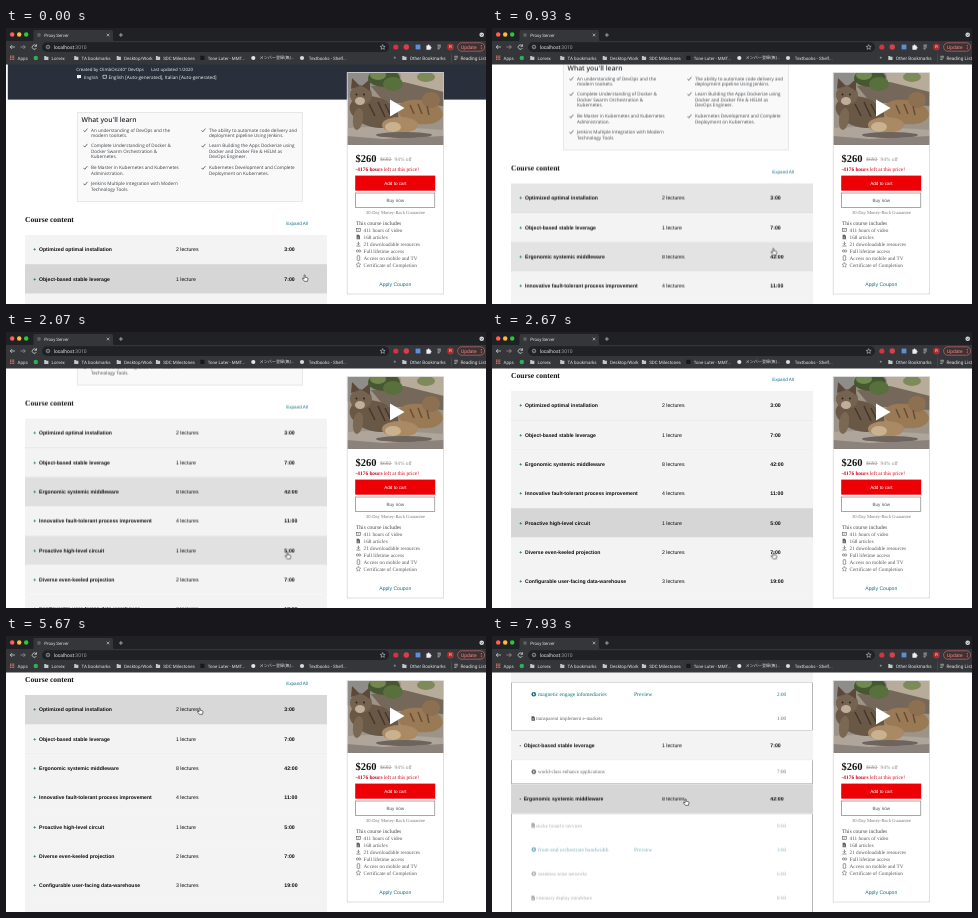
Recreate the animation shown at these times as an HTML page. Size 480 px wide and 276 px high, loop 8000 ms.

```html
<!DOCTYPE html>
<html lang="en">
<head>
<meta charset="utf-8">
<title>Course page</title>
<style>
html, body { margin: 0; width: 100%; height: 100%; overflow: hidden; background: #fff; }
svg { display: block; width: 100vw; height: 100vh; }
text { white-space: pre; text-rendering: geometricPrecision; }
.ui { font-family: Roboto, "Noto Sans CJK JP", "Noto Sans CJK", sans-serif; }
.open { font-family: "Open Sans", sans-serif; }
.sans { font-family: "Liberation Sans", Arial, sans-serif; }
.serif { font-family: "Liberation Serif", Times, serif; }
.b { font-weight: 700; }
.semi { font-weight: 600; }
.end { text-anchor: end; }
.mid { text-anchor: middle; }

.anim { animation-duration: 8s; animation-iteration-count: infinite; animation-timing-function: ease-in-out; }
.hover { opacity: 0; animation-timing-function: linear; }
.toggle { animation-timing-function: step-end; }

#page { animation-name: scroll; }
@keyframes scroll {
  0%, .9% { transform: translateY(0); }
  8.1%, 20.9% { transform: translateY(-51.5px); }
  25.6%, 31.6% { transform: translateY(-120.5px); }
  33.2%, 87.8% { transform: translateY(-148px); }
  90.9%, 100% { transform: translateY(-190px); }
}
#cursor { animation-name: point; }
@keyframes point {
  0%, .9% { transform: translate(299px, 250px); }
  5%, 35.9% { transform: translate(281.7px, 223.5px); }
  45.9%, 46.6% { transform: translate(225px, 190px); }
  52.5%, 57.5% { transform: translate(225px, 259px); }
  67.5%, 68.4% { transform: translate(200px, 118px); }
  70.9%, 78.8% { transform: translate(194px, 75px); }
  81%, 83.5% { transform: translate(194px, 152px); }
  86%, 88.5% { transform: translate(194px, 181px); }
  90.9%, 100% { transform: translate(194px, 166px); }
}
#push1 { animation-name: push1; }
#push2 { animation-name: push2; }
#push3 { animation-name: push3; }
@keyframes push1 { 0%, 75% { transform: translateY(0); } 78.5%, 100% { transform: translateY(48.2px); } }
@keyframes push2 { 0%, 82.5% { transform: translateY(0); } 85%, 100% { transform: translateY(24.3px); } }
@keyframes push3 { 0%, 93.4% { transform: translateY(0); } 98.8%, 100% { transform: translateY(195px); } }

#items3 { animation-name: appear; animation-timing-function: linear; }
@keyframes appear { 0%, 93.4% { opacity: 0; } 99.1% { opacity: .55; } 100% { opacity: .6; } }

.plus1 { animation-name: off1; } .minus1 { animation-name: on1; }
.plus2 { animation-name: off2; } .minus2 { animation-name: on2; }
.plus3 { animation-name: off3; } .minus3 { animation-name: on3; }
@keyframes on1 { 0% { opacity: 0; } 75%, 100% { opacity: 1; } }
@keyframes off1 { 0% { opacity: 1; } 75%, 100% { opacity: 0; } }
@keyframes on2 { 0% { opacity: 0; } 82.5%, 100% { opacity: 1; } }
@keyframes off2 { 0% { opacity: 1; } 82.5%, 100% { opacity: 0; } }
@keyframes on3 { 0% { opacity: 0; } 93.4%, 100% { opacity: 1; } }
@keyframes off3 { 0% { opacity: 1; } 93.4%, 100% { opacity: 0; } }

#hover1 { animation-name: hover1; }
#hover2 { animation-name: hover2; }
#hover3 { animation-name: hover3; }
#hover5 { animation-name: hover5; }
#hover6 { animation-name: hover6; }
#hover7 { animation-name: hover7; }
@keyframes hover1 {
  0%, 1.2%, 15%, 69.5%, 82%, 100% { opacity: 0; }
  4%, 9%, 71%, 79% { opacity: 1; }
  11.6% { opacity: .5; }
}
@keyframes hover2 { 0%, 1.2%, 81.5%, 88% { opacity: 1; } 4%, 80%, 91%, 100% { opacity: 0; } }
@keyframes hover3 {
  0%, 9%, 30%, 89.5% { opacity: 0; }
  11.6% { opacity: .55; }
  15%, 21%, 91.5%, 100% { opacity: 1; }
  25.9% { opacity: .7; }
}
@keyframes hover5 { 0%, 23%, 56%, 100% { opacity: 0; } 25.9% { opacity: .6; } 30%, 53.5% { opacity: 1; } }
@keyframes hover6 { 0%, 34%, 43%, 100% { opacity: 0; } 36%, 40% { opacity: .8; } }
@keyframes hover7 { 0%, 53.5%, 61%, 100% { opacity: 0; } 56%, 58% { opacity: 1; } }
</style>
</head>
<body>
<svg id="stage" viewBox="0 0 480 276" preserveAspectRatio="none"></svg>
<script>
const PITCH = 29.3, ITEM = 24.2, TOP = 207;
const TEAL = '#126f84';

// y is the vertical middle of the lower-case line
const text = (x, y, str, size, fill, cls) =>
  `<text x="${x}" y="${(y + size * .35).toFixed(2)}" font-size="${size}" fill="${fill}" class="${cls}">${str}</text>`;
const rect = (x, y, w, h, fill, more = '') =>
  `<rect x="${x}" y="${y}" width="${w}" height="${h}" fill="${fill}" ${more}/>`;
const dot = (x, y, r, fill, more = '') =>
  `<circle cx="${x}" cy="${y}" r="${r}" fill="${fill}" ${more}/>`;
const line = (d, stroke, width = .7) =>
  `<path d="${d}" fill="none" stroke="${stroke}" stroke-width="${width}"/>`;
const lines = (x, y, list) => list.map((s, i) => text(x, y + i * 5.6, s, 4.58, '#3c3f44', 'open')).join('');

function point(x, y, list) {
  return line(`M${x - 7.5} ${y + .2}l1.3 1.4 2.6-3.2`, '#333', .7) + lines(x, y, list);
}

function header() {
  const w = '#f1f2f3';
  return rect(1.8, 20, 478.2, 51.6, '#29303b') +
    text(70.3, 41, 'Created by ClimbOn240° DevOps', 4.4, w, 'open') +
    text(145, 41, 'Last updated 1/2020', 4.4, w, 'open') +
    `<path d="M71 47h4v3h-2l-1.2 1v-1H71z" fill="${w}"/>` +
    text(78, 49, 'English', 4.3, w, 'open') +
    rect(97, 47.2, 3.6, 3, 'none', `stroke="${w}" stroke-width=".6"`) +
    text(102.4, 49, 'English [Auto-generated], Italian [Auto-generated]', 4.7, w, 'open');
}

function learn() {
  return rect(71.3, 84.5, 225, 89, '#f9f9f9', 'stroke="#dcdee0" stroke-width=".7"') +
    text(75.5, 92, 'What you\'ll learn', 6.75, '#2b2d31', 'open semi') +
    point(85, 102.2, ['An understanding of DevOps and the', 'modern toolsets.']) +
    point(85, 117.5, ['Complete Understanding of Docker &amp;', 'Docker Swarm Orchestration &amp;', 'Kubernetes.']) +
    point(85, 139.7, ['Be Master in Kubernetes and Kubernetes', 'Administration.']) +
    point(85, 155.5, ['Jenkins Multiple Integration with Modern', 'Technology Tools.']) +
    point(203, 102.2, ['The ability to automate code delivery and', 'deployment pipeline Using Jenkins.']) +
    point(203, 117.5, ['Learn Building the Apps Dockerize using', 'Docker and Docker File &amp; HELM as', 'DevOps Engineer.']) +
    point(203, 139.7, ['Kubernetes Development and Complete', 'Deployment on Kubernetes.']);
}

const rows = [
  ['Optimized optimal installation', '2 lectures', '3:00'],
  ['Object-based stable leverage', '1 lecture', '7:00'],
  ['Ergonomic systemic middleware', '8 lectures', '42:00'],
  ['Innovative fault-tolerant process improvement', '4 lectures', '11:00'],
  ['Proactive high-level circuit', '1 lecture', '5:00'],
  ['Diverse even-keeled projection', '2 lectures', '7:00'],
  ['Configurable user-facing data-warehouse', '3 lectures', '19:00'],
  ['', '', '']
];

function row(n) {
  const [title, count, time] = rows[n - 1];
  const y = TOP + (n - 1) * PITCH, mid = y + 14.6;
  const t = (x, s, cls = 'sans', size = 5.13, fill = '#0c0c0c') => text(x, mid, s, size, fill, cls);
  const plus = title && t(27.2, '+', 'sans b', 5.13, '#17606e') + t(33, title, 'sans b');
  const minus = t(27.4, '-', 'sans b') + t(31.7, title, 'sans b');
  const label = n < 4
    ? `<g class="anim toggle plus${n}">${plus}</g><g class="anim toggle minus${n}">${minus}</g>`
    : plus;
  return rect(19, y, 302, PITCH + .3, '#f3f3f3') +
    `<g id="hover${n}" class="anim hover">${rect(19, y, 302, PITCH, '#d6d6d6')}</g>` +
    label + t(170, count, 'sans', 5.2) + t(278.3, time, 'sans b', 5.2);
}

const sheet = (x, y, c) => `<path d="M${x - 1.7} ${y - 2.3}h2.2l1.2 1.2v3.4h-3.4z" fill="${c}"/>` +
  line(`M${x - .9} ${y + .1}h1.8m-1.8 1.1h1.8`, '#fff', .4);
const play = (x, y, c) => dot(x, y, 2.3, c) + `<path d="M${x - .7} ${y - 1.2}l1.9 1.2-1.9 1.2z" fill="#fff"/>`;

function panel(n, items, height) {
  const y = TOP + n * PITCH;
  const body = items.map(([kind, name, time], i) => {
    const mid = y + 12 + i * ITEM, link = kind === 'link';
    const ink = link ? TEAL : '#606060';
    return (kind === 'file' ? sheet(41.2, mid, '#555') : play(41.8, mid, link ? TEAL : '#666')) +
      text(kind === 'file' ? 44 : 46, mid, name, link ? 5.5 : 5.05, ink, 'serif') +
      (link ? text(142, mid - .3, 'Preview', 5.6, TEAL, 'serif') : '') +
      text(294, mid, time, 5.1, link ? TEAL : '#666', 'serif end');
  }).join('');
  return rect(19.3, y, 301.4, height, '#fff', 'stroke="#858585" stroke-width=".6"') +
    `<g id="items${n}" class="anim">${body}</g>`;
}

function course() {
  const tail = [4, 5, 6, 7, 8].map(row).join('');
  const first = panel(1, [['link', 'magnetic engage infomediaries', '2:00'],
    ['file', 'transparent implement e-markets', '1:00']], 48);
  const second = panel(2, [['play', 'world-class enhance applications', '7:00']], 24.1);
  const third = panel(3, [['file', 'sticky brand e-services', '9:00'],
    ['link', 'front-end orchestrate bandwidth', '3:00'],
    ['play', 'seamless seize networks', '6:00'],
    ['file', 'visionary deploy mindshare', '8:00']], 194.8);
  const push = (n, inner) => `<g id="push${n}" class="anim">${inner}</g>`;
  return text(19, 191.6, 'Course content', 7.55, '#111', 'serif b') +
    text(280.2, 195.6, 'Expand All', 4.6, TEAL, 'sans') +
    first + row(1) + push(1, second + row(2) + push(2, third + row(3) + push(3, tail)));
}

function photo() {
  const blob = (x, y, rx, ry, fill, turn = 0) =>
    `<ellipse cx="${x}" cy="${y}" rx="${rx}" ry="${ry}" fill="${fill}" transform="rotate(${turn} ${x} ${y})"/>`;
  const path = (d, fill) => `<path d="${d}" fill="${fill}"/>`;
  return `<clipPath id="frame">${rect(341.8, 44.9, 95.4, 72, '#000')}</clipPath><g clip-path="url(#frame)">` +
    rect(341, 44, 97, 74, '#9c9389') +
    path('M341 44h30l-6 18-24 8z', '#8f8d89') +
    path('M394 44h44v26l-40-6z', '#b7ab9a') +
    path('M365 58l33-4 40 10v14l-60-4z', '#75685a') +
    blob(378, 50, 16, 9, '#45582f') + blob(387, 56, 10, 7, '#58703d') + blob(372, 47, 8, 5, '#71884f') +
    blob(420, 49, 9, 5, '#7f8a5a') +
    path('M341 100l40-2 57 4v16h-97z', '#afa59a') +
    path('M341 108l36 3 61-3v10h-97z', '#8b837b') +
    blob(368, 84, 25, 15, '#6a5846', 16) +
    blob(355, 67, 11, 10, '#75634f') +
    path('M345 61l1-11 8 8zM356 58l8-7v12z', '#5a4a3a') +
    blob(354, 73, 5, 4, '#bfae99') +
    dot(350.5, 66.5, 1, '#2c261d') + dot(358, 66.5, 1, '#2c261d') +
    line('M363 76l6 12m3-14l7 15m0-13l6 12', '#453729', 1.6) +
    blob(352, 91, 5, 11, '#7b6852', 8) +
    blob(414, 84, 23, 12, '#9a7a55', 8) +
    blob(425, 72, 9, 8, '#8d7050') +
    blob(394, 97, 18, 8, '#a98a65') + blob(387, 99, 8, 5, '#c9b292') +
    line('M404 77l4 9m4-10l4 10m5-8l2 9', '#66503a', 1.6) +
    blob(398, 107, 28, 3, '#6c645d') +
    '</g>' + path('M384 71.5l14.5 8.5-14.5 8.5z', '#fff');
}

function card() {
  const list = ['411 hours of video', '168 articles', '21 downloadable resources',
    'Full lifetime access', 'Access on mobile and TV', 'Certificate of Completion'];
  const gray = '#5c5c5c', s = (x, y, str, size, fill, cls = '') => text(x, y, str, size, fill, 'serif ' + cls);
  const box = (x, y, w, h, r = 0) => rect(x, y, w, h, 'none', `rx="${r}" stroke="${gray}" stroke-width=".6"`);
  const icons = box(350.3, 200.4, 4.2, 3.2) + line('M351.7 202h1.5', gray) +
    sheet(352.3, 209, gray) +
    line('M352.4 213.6v3m-1.3-1.2l1.3 1.3 1.3-1.3M350.4 218h4', gray) +
    dot(351.4, 223, 1.1, 'none', `stroke="${gray}" stroke-width=".6"`) +
    dot(353.7, 223, 1.1, 'none', `stroke="${gray}" stroke-width=".6"`) +
    box(351.2, 227.7, 2.5, 4.6, .4) +
    line('M352.4 234.4l.7 1.6 1.7.2-1.3 1.2.4 1.8-1.5-.9-1.5.9.4-1.8-1.3-1.2 1.7-.2z', gray, .5);
  return rect(341.2, 44.6, 96.4, 221.4, '#fff', 'stroke="#d8d8d8" stroke-width=".8"') + photo() +
    s(349.4, 130.3, '$260', 10.5, '#151515', 'b') +
    s(374.3, 131, '$692', 5.5, '#8b8b8b') + line('M374 131.4h12', '#8b8b8b', .5) +
    s(388.5, 131, '94% off', 5.4, '#8b8b8b') +
    s(349.6, 141, '<tspan class="b">-4176 hours</tspan> left at this price!', 5.35, '#d0061b') +
    rect(349.2, 147.6, 80, 15.1, '#ec0005') +
    text(389.3, 155, 'Add to cart', 4.6, '#fff', 'sans mid') +
    rect(349.6, 165, 79.2, 14.3, '#fff', 'stroke="#6e6e6e" stroke-width=".6"') +
    text(389.3, 172, 'Buy now', 4.6, '#555', 'sans mid') +
    s(389.5, 184.3, '30-Day Money-Back Guarantee', 4.6, '#777', 'mid') +
    s(350, 195, 'This course includes', 5.5, '#444') + icons +
    list.map((v, i) => s(357.6, 202 + i * 7, v, 5.2, '#555')).join('') +
    text(389.3, 256.7, 'Apply Coupon', 5.1, TEAL, 'sans mid');
}

function chrome() {
  const ink = '#dfe1e4', dim = '#9aa0a6';
  const t = (x, y, s, size = 4.5, fill = ink) => text(x, y, s, size, fill, 'ui');
  const folder = x => `<path d="M${x - 2} 28h1.6l.6.7h2v3.3H${x - 2}z" fill="#c3c6ca"/>`;
  const marks = [[45.5, 'Lorvex'], [75.5, 'TA bookmarks'], [118, 'Desktop/Work'], [157.2, 'SDC Milestones']];
  let grid = '';
  for (let i = 0; i < 9; i++) grid += rect(4 + i % 3 * 1.6, 27.6 + Math.floor(i / 3) * 1.6, 1.1, 1.1, '#e0776b');
  return rect(0, 0, 480, 13.5, '#202124') + rect(0, 13, 480, 23.5, '#35363a') +
    dot(6.2, 6.5, 2.2, '#fe5f57') + dot(13.2, 6.5, 2.2, '#febc2e') + dot(20.2, 6.5, 2.2, '#28c840') +
    '<path d="M26 13.2q1.5 0 1.5-2V4q0-2 2-2h75.500q2 0 2 2v7.2q0 2 1.5 2z" fill="#35363a"/>' +
    dot(33, 7, 1.9, '#5b5e63') + t(38.2, 7, 'Proxy Server', 4.45) +
    line('M100.8 5.7l2.6 2.6m0-2.6l-2.6 2.6', ink, .6) + line('M112.9 7h4m-2-2v4', ink, .6) +
    dot(475.7, 6.8, 2.3, '#d5d7da') + line('M474.6 6.4l1.1 1 1.1-1', '#202124', .6) +
    line('M9 19H4.2m2-2l-2 2 2 2', ink) + line('M14.5 19h4.8m-2-2l2 2-2 2', dim) +
    line('M30.3 18a2.2 2.2 0 1 0 .1 2M30.5 16.3v2h-2', ink) +
    rect(36, 14.2, 347, 9.8, '#202124', 'rx="4.9"') +
    dot(42, 19, 1.8, 'none', `stroke="${ink}" stroke-width=".5"`) + line('M42 18.6v1.4m0-2.3v.5', ink, .5) +
    t(47.7, 19, `localhost<tspan fill="${dim}">:3010</tspan>`, 5) +
    line('M376.7 16.6l.7 1.7 1.8.1-1.4 1.2.5 1.8-1.6-1-1.6 1 .5-1.8-1.4-1.2 1.8-.1z', ink, .5) +
    dot(389.8, 19, 2.6, '#d8323c') + dot(400.3, 19, 2.7, '#d9414a') + rect(409.6, 16.6, 4.8, 4.8, '#5c8fd6') +
    '<path d="M420.4 17.5h1.2a.9.9 0 0 1 1.8 0h1.2v1.3a.9.9 0 0 1 0 1.8v1.1h-4.200z" fill="#eceef0"/>' +
    line('M431.5 17.2h3.4m-3.4 1.8h3.4m-3.4 1.8h2.2', ink, .7) +
    dot(444.5, 19, 3.4, '#a5302f') + text(444.5, 19, 'R', 4, '#fff', 'ui mid') +
    rect(451.6, 14.8, 27, 8.4, '#3f3133', 'rx="4.2" stroke="#d9766f" stroke-width=".6"') +
    t(455, 19, 'Update', 4.9, '#ee8f87') + line('M475.3 17v.9m0 .7v.9m0 .7v.9', '#ee8f87', .8) +
    grid + t(11.6, 30, 'Apps') + dot(29.8, 30, 2.2, '#2fae57') +
    marks.map(([x, s]) => folder(x - 5.3) + t(x, 30, s)).join('') +
    rect(194.3, 27.8, 4.2, 4.2, '#17181a') + t(201.7, 30, 'Tone Later - MMT...', 4.4) +
    dot(247.3, 30, 2.1, '#e4e6e8') + t(253.6, 30, 'メンバー登録(無)...', 4.1) +
    dot(296, 30, 2.1, '#d8dadd') + t(302.7, 30, 'Textbooks - Shelf...') +
    t(387.6, 29.7, '»', 5) + folder(398.3) + t(403.8, 30, 'Other Bookmarks', 4.65) +
    line('M445.5 25.5v9', '#5f6368', .4) +
    line('M448.3 28.3h3.6m-3.6 1.6h3.6m-3.6 1.6h2.2', ink, .6) + t(454.4, 30, 'Reading List', 4.7);
}

const hand = '<path d="M-.9-2.9q.7-.5 1.1.2v2l2 .4q.9.2.8 1.2l-.5 2.4H-.6L-2.6.8q-.2-.8.7-.6l1 .7z" ' +
  'fill="#fff" stroke="#222" stroke-width=".6" stroke-linejoin="round"/>';

document.getElementById('stage').innerHTML =
  rect(0, 0, 480, 276, '#fff') +
  `<g id="page" class="anim">${header()}${learn()}${course()}</g>` +
  card() + chrome() + `<g id="cursor" class="anim">${hand}</g>`;
</script>
</body>
</html>
```
